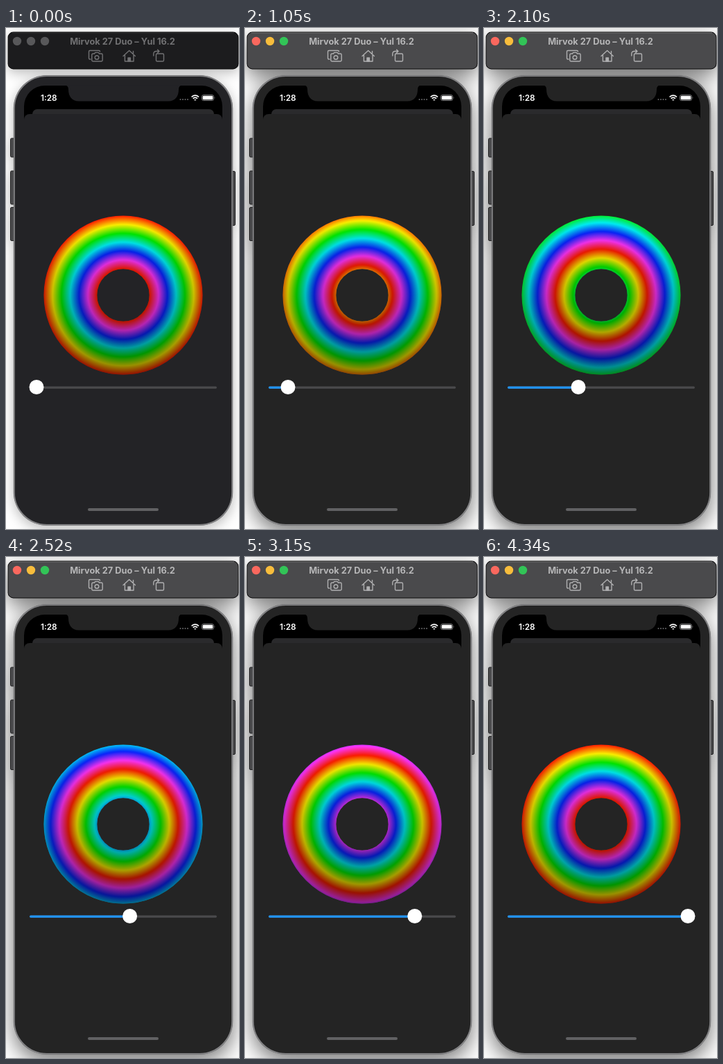
An HTML page that plays this animation: 336 by 722 pixels, repeating every 4.48 s.

```html
<!DOCTYPE html>
<html lang="en">
<head>
<meta charset="utf-8">
<title>Colour cycling ring</title>
<style>
  html, body { margin: 0; width: 100%; height: 100%; overflow: hidden; background: #fff; }
  svg {
    display: block; width: 336px; height: 722px;
    font-family: Inter, "Liberation Sans", sans-serif;
    --bar: #1c1c1e; --edge: #303032; --label: #717173; --icon: #727274;
    --close: #58585a; --mini: #58585a; --zoom: #58585a; --face: #232326;
    --shadow: drop-shadow(0 5px 9px rgba(0, 0, 0, .27));
  }
  svg.active {
    --bar: #4a4a4c; --edge: #6a6a6c; --label: #b6b6b7; --icon: #b0b0b1;
    --close: #fa685e; --mini: #f8bd3c; --zoom: #32c457; --face: #242424;
    --shadow: drop-shadow(0 10px 15px rgba(0, 0, 0, .54));
  }
  .window { filter: var(--shadow); }
  .face { fill: var(--face); }
  .icons { fill: none; stroke: var(--icon); stroke-width: 1.4; stroke-linejoin: round; stroke-linecap: round; }
</style>
</head>
<body>
<svg id="stage" viewBox="0 0 336 722">
  <defs>
    <radialGradient id="hues" gradientUnits="userSpaceOnUse" cx="169" cy="385" r="114.5"></radialGradient>
    <linearGradient id="shade" gradientUnits="userSpaceOnUse" x1="0" y1="270.5" x2="0" y2="499.5">
      <stop offset="0" stop-opacity="0"/>
      <stop offset="1" stop-opacity=".43"/>
    </linearGradient>
  </defs>

  <g class="window">
    <rect x="2.6" y="5.6" width="332.8" height="53.8" rx="8" fill="#0c0c0d"/>
    <g fill="#4b4b4d" stroke="#1e1e1f">
      <rect x="6.5" y="159" width="7" height="27" rx="1.6"/>
      <rect x="6.5" y="206" width="7" height="48" rx="1.6"/>
      <rect x="6.5" y="258.5" width="7" height="48" rx="1.6"/>
      <rect x="324" y="206.5" width="6.5" height="78" rx="1.6"/>
    </g>
    <rect x="10.8" y="68" width="316.4" height="649" rx="48" fill="#5c5c5e"/>
  </g>

  <rect x="3.5" y="6.6" width="331" height="51.8" rx="7" fill="var(--bar)"/>
  <path d="M9 7.1H329" stroke="var(--edge)"/>
  <circle cx="16" cy="19" r="6.2" fill="var(--close)"/>
  <circle cx="36" cy="19" r="6.2" fill="var(--mini)"/>
  <circle cx="56" cy="19" r="6.2" fill="var(--zoom)"/>
  <text x="168" y="24" text-anchor="middle" font-size="12.8" font-weight="700" fill="var(--label)">Mirvok 27 Duo – Yul 16.2</text>
  <g class="icons">
    <path d="M122 45h-1a1.5 1.5 0 0 1-1.5-1.5V34a1.5 1.5 0 0 1 1.5-1.5h13a1.5 1.5 0 0 1 1.5 1.5"/>
    <path d="M125.5 37h2l1.2-1.6h4.6l1.2 1.6h3a1.7 1.7 0 0 1 1.7 1.7v7.6a1.7 1.7 0 0 1-1.7 1.7h-12a1.7 1.7 0 0 1-1.7-1.7v-7.6a1.7 1.7 0 0 1 1.7-1.7z"/>
    <circle cx="131" cy="42.500" r="2.800"/>
    <path d="M169 40.500L177.700 32.500L186.400 40.500M171.400 39v9h12.600v-9M183.500 33.500v3"/>
    <path d="M176 43h3.400v5h-3.400z" fill="var(--icon)"/>
    <rect x="216.500" y="37" width="11" height="11" rx="1.600"/>
    <path d="M212.800 40v-2.500q0-4 4-4h4M218.600 31.300l2.400 2.200l-2.400 2.200"/>
  </g>

  <rect class="face" x="12" y="69.200" width="314" height="646.600" rx="46.800" stroke="#868688" stroke-width="1.600"/>
  <path d="M26 132V113a30 30 0 0 1 30-30H282a30 30 0 0 1 30 30V132z" fill="#000"/>
  <path class="face" d="M85 82.500q5 .5 5 6c0 10 5 17 15 17H234c10 0 15-7 15-17q0-5.500 5-6z"/>
  <path d="M38 126v-2a7 7 0 0 1 7-7H293a7 7 0 0 1 7 7v2z" fill="#2a2a2c"/>
  <path class="face" d="M26 133v-1a8 8 0 0 1 8-8H304a8 8 0 0 1 8 8v1z"/>

  <text x="50" y="104.700" font-size="11.800" font-weight="600" fill="#fff">1:28</text>
  <g fill="#69696b">
    <circle cx="251.500" cy="103" r="1"/><circle cx="255" cy="103" r="1"/>
    <circle cx="258.500" cy="103" r="1"/><circle cx="262" cy="103" r="1"/>
  </g>
  <g fill="none" stroke="#fff" stroke-width="1.700">
    <path d="M267.600 99.300q5.200-4.200 10.400 0M269.600 101.600q3.200-2.500 6.400 0"/>
    <path d="M271 102.900h3.600l-1.800 1.900z" fill="#fff" stroke="none"/>
  </g>
  <rect x="282.500" y="96.500" width="17" height="8" rx="2.300" fill="none" stroke="#8b8b8d" stroke-width=".9"/>
  <rect x="283.700" y="97.700" width="14.600" height="5.600" rx="1.300" fill="#fff"/>
  <path d="M300.800 99q1.200 1.500 0 3z" fill="#8b8b8d"/>

  <g fill="none" stroke-width="76.800">
    <circle cx="169" cy="385" r="76.100" stroke="url(#hues)"/>
    <circle cx="169" cy="385" r="76.100" stroke="url(#shade)"/>
  </g>

  <rect x="34" y="516.500" width="270" height="3.200" rx="1.600" fill="#4a4a4c"/>
  <rect id="fill" x="34" y="516.500" height="3.200" rx="1.600" fill="#2094fa"/>
  <circle id="thumb" cy="517.500" r="10.500" fill="#fff"/>
  <rect x="118" y="692" width="102" height="4" rx="2" fill="#616163"/>
</svg>

<script>
const LOOP = 4480, STEP = 70, LAST = 4340, ACTIVATE = 630;
const OUTER = 114.5, DEPTH = 76.3, STOPS = 60;
const START_X = 44, TRAVEL = 250;

// Drag path of the thumb: [time in ms, x]
const drag = [[630, 44], [1050, 62], [1610, 99], [2100, 136], [2870, 215.5], [3430, 271], [3850, 294]];

// Red, yellow, green, cyan, blue, magenta
const wheel = [[255, 28, 0], [255, 242, 0], [0, 238, 0], [0, 240, 245], [8, 36, 255], [255, 52, 250]];

const byId = id => document.getElementById(id);
const stage = byId("stage"), thumb = byId("thumb"), fill = byId("fill");

const stops = Array.from({ length: STOPS + 1 }, (_, i) => {
  const stop = document.createElementNS("http://www.w3.org/2000/svg", "stop");
  const depth = 1 - i / STOPS;
  stop.setAttribute("offset", (OUTER - DEPTH * depth) / OUTER);
  byId("hues").append(stop);
  return { stop, depth };
});

function hueColor(hue) {
  const pos = (hue - Math.floor(hue)) * 6;
  const i = Math.floor(pos) % 6, mix = pos - Math.floor(pos);
  const next = wheel[(i + 1) % 6];
  return `rgb(${wheel[i].map((c, k) => Math.round(c + (next[k] - c) * mix))})`;
}

function slope(i) {
  if (i === 0 || i === drag.length - 1) return 0;
  const [t0, x0] = drag[i - 1], [t1, x1] = drag[i + 1];
  return (x1 - x0) / (t1 - t0);
}

// Smooth Hermite curve through the drag points
function thumbX(t) {
  const end = drag.length - 1;
  if (t <= drag[0][0]) return drag[0][1];
  if (t >= drag[end][0]) return drag[end][1];
  const i = drag.findIndex(p => p[0] > t) - 1;
  const [t0, x0] = drag[i], [t1, x1] = drag[i + 1];
  const span = t1 - t0, u = (t - t0) / span, v = 1 - u;
  return x0 * (1 + 2 * u) * v * v + x1 * (3 - 2 * u) * u * u
    + span * u * v * (slope(i) * v - slope(i + 1) * u);
}

function draw(time) {
  const t = Math.min(Math.floor(time % LOOP / STEP) * STEP, LAST);
  const x = thumbX(t), amount = (x - START_X) / TRAVEL;
  stage.classList.toggle("active", t >= ACTIVATE);
  thumb.setAttribute("cx", x);
  fill.setAttribute("width", x - 34);
  for (const { stop, depth } of stops) stop.setAttribute("stop-color", hueColor(amount + depth));
}

const begin = performance.now();
function tick() {
  draw(performance.now() - begin);
  requestAnimationFrame(tick);
}
tick();
</script>
</body>
</html>
```
